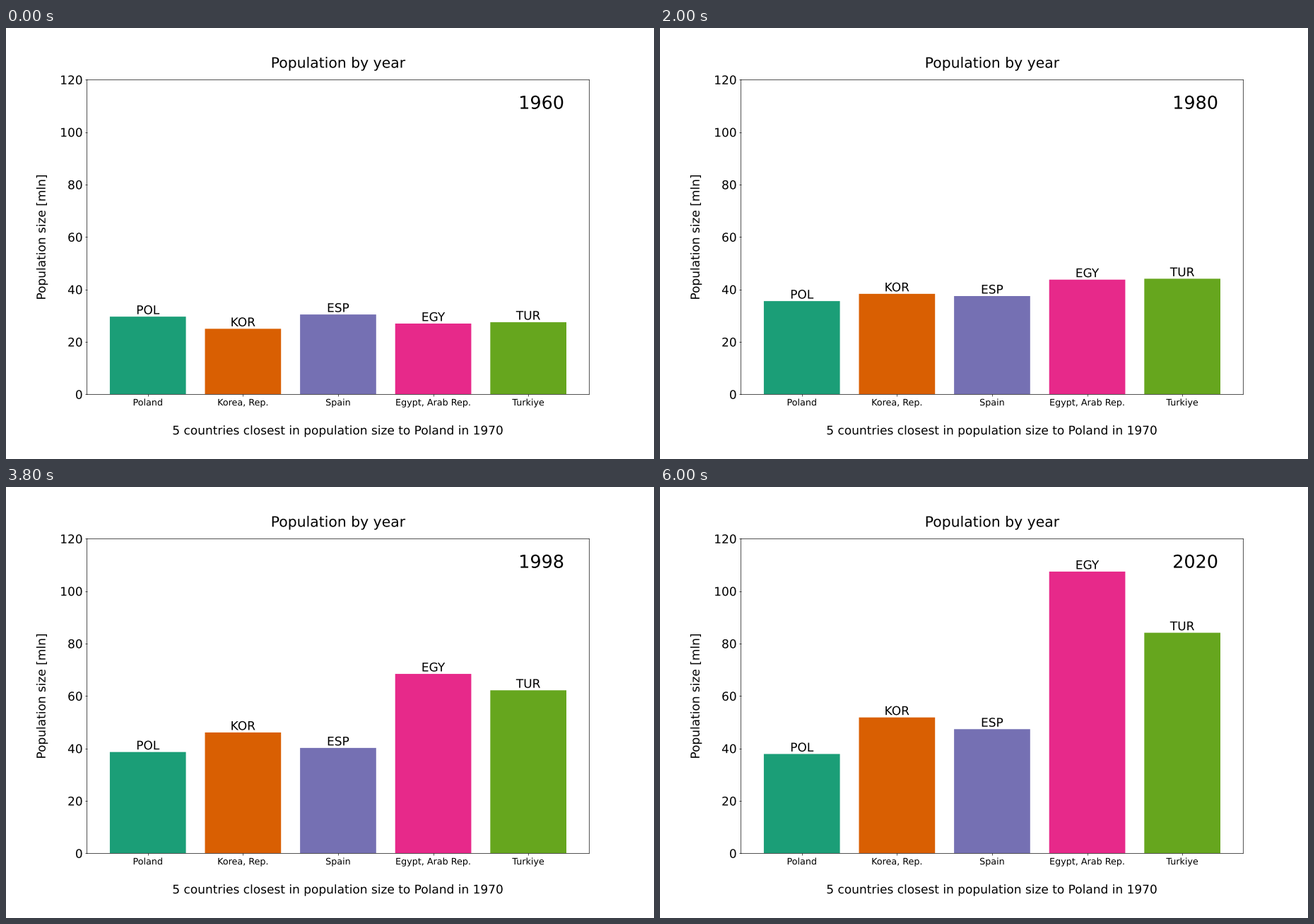
A matplotlib script for the animation above (6.1 s loop, 917 by 611 pixels).

```python
import numpy as np
import matplotlib.pyplot as plt
from matplotlib.animation import FuncAnimation
from matplotlib.patheffects import Normal

DPI = 61.1
EPS = 1e-6  # keeps the pixel size from rounding down
FIRST, LAST = 1960, 2020

# code: (name, colour, key points of year and population in millions)
COUNTRIES = {
    "POL": ("Poland", "#1b9e77",
            [(1960, 29.64), (1970, 32.66), (1980, 35.57), (1990, 38.11),
             (1999, 38.66), (2000, 38.26), (2010, 38.04), (2020, 37.9)]),
    "KOR": ("Korea, Rep.", "#d95f02",
            [(1960, 25.01), (1970, 32.24), (1983, 39.91), (1995, 45.09),
             (2010, 49.55), (2020, 51.84)]),
    "ESP": ("Spain", "#7570b3",
            [(1960, 30.46), (1970, 33.81), (1980, 37.49), (1987, 38.68),
             (2001, 40.85), (2009, 46.36), (2012, 46.77), (2015, 46.44),
             (2020, 47.37)]),
    "EGY": ("Egypt, Arab Rep.", "#e7298a",
            [(1960, 27.0), (1972, 36.3), (1980, 43.75), (1990, 57.2),
             (2000, 71.4), (2010, 87.25), (2015, 97.72), (2020, 107.47)]),
    "TUR": ("Turkiye", "#66a61e",
            [(1960, 27.51), (1972, 37.25), (1980, 44.1), (1990, 54.3),
             (2000, 64.1), (2011, 74.17), (2015, 79.65), (2020, 84.14)]),
}

plt.rcParams.update({
    "font.family": "DejaVu Sans",
    # Soft edges: shapes and text sit at fractions of a pixel.
    "path.snap": False,
    "path.effects": [Normal()],
    "text.hinting": "no_hinting",
})


def growth(points, years):
    """Smooth cubic curve through the points that never overshoots them."""
    x, y = np.array(points).T
    step = np.diff(x)
    rate = np.diff(y) / step
    slope = np.concatenate([rate[:1], np.zeros(len(x) - 2), rate[-1:]])
    for i, (a, b) in enumerate(zip(rate, rate[1:]), start=1):
        if a * b > 0:
            slope[i] = 2 * a * b / (a + b)

    i = np.clip(np.searchsorted(x, years, side="right") - 1, 0, len(step) - 1)
    t = (years - x[i]) / step[i]
    ease = t * t * (3 - 2 * t)
    bend = t * (1 - t) * ((1 - t) * slope[i] - t * slope[i + 1])
    return y[i] + ease * (y[i + 1] - y[i]) + step[i] * bend


years = np.arange(FIRST, LAST + 1)
names, colors, points = zip(*COUNTRIES.values())
sizes = np.array([growth(p, years) for p in points]).T

fig, ax = plt.subplots(figsize=((917 + EPS) / DPI, (611 + EPS) / DPI), dpi=DPI)
fig.subplots_adjust(left=0.125, right=0.9, bottom=0.15, top=0.88)

bars = ax.bar(names, sizes[0], color=colors)
labels = [ax.text(x, size, code, fontsize=20, ha="center", va="bottom")
          for x, (code, size) in enumerate(zip(COUNTRIES, sizes[0]))]
year_text = ax.text(0.95, 0.95, str(FIRST), transform=ax.transAxes,
                    fontsize=30, ha="right", va="top")

ax.set_ylim(0, 120)
ax.tick_params(axis="x", labelsize=15)
ax.tick_params(axis="y", labelsize=20)
ax.set_title("Population by year", fontsize=24, pad=20)
ax.set_ylabel("Population size [mln]", fontsize=20, labelpad=20)
ax.set_xlabel("5 countries closest in population size to Poland in 1970",
              fontsize=20, labelpad=30)


def update(frame):
    for bar, label, size in zip(bars, labels, sizes[frame]):
        bar.set_height(size)
        label.set_y(size)
    year_text.set_text(str(years[frame]))
    return [*bars, *labels, year_text]


anim = FuncAnimation(fig, update, frames=len(years), interval=100,
                     repeat=True, repeat_delay=0)
plt.show()
```
